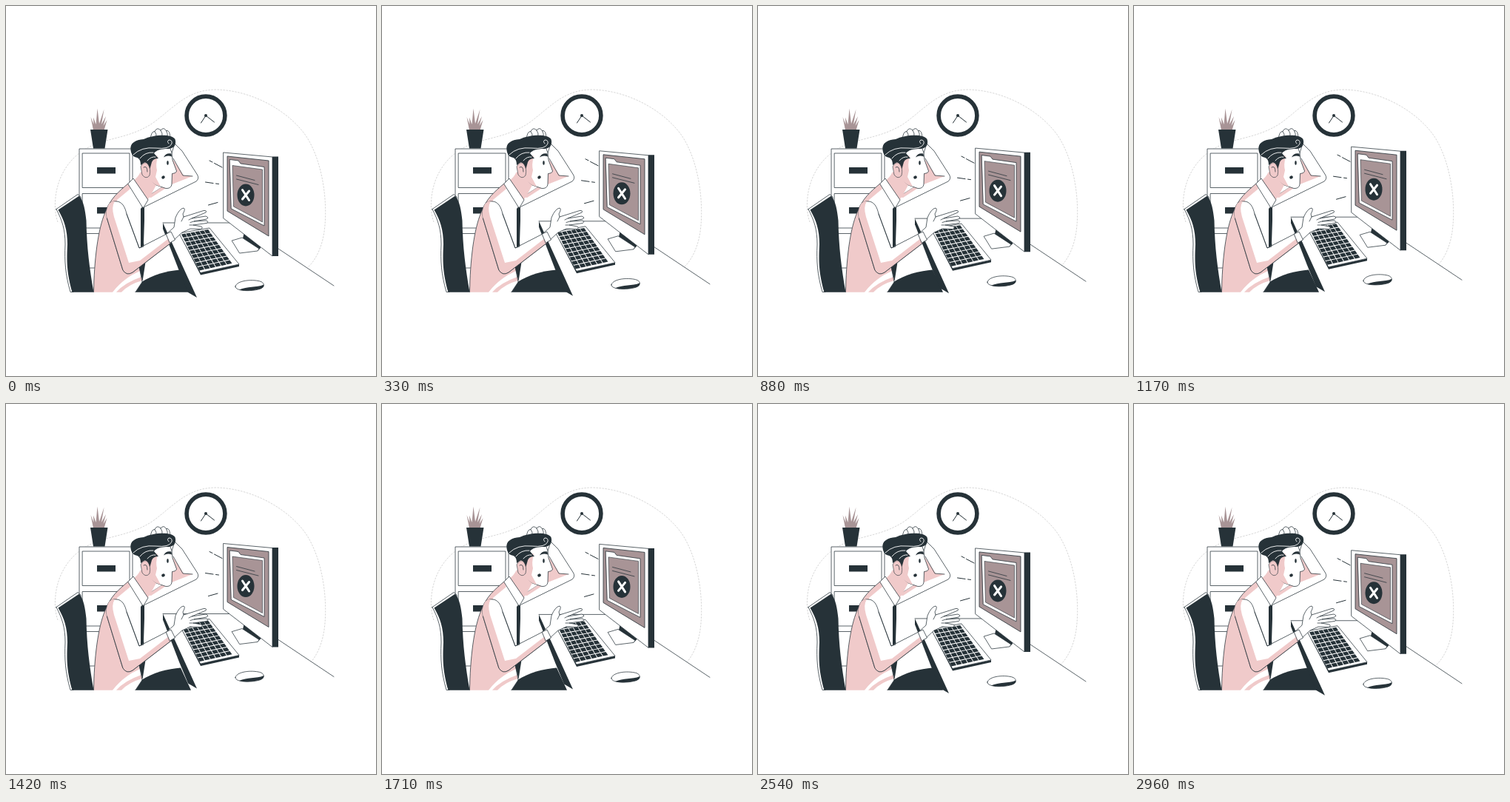
An HTML page for the animation above (3000 ms loop, 500 by 500 pixels).

```html
<!DOCTYPE html>
<html lang="en">
<head>
<meta charset="utf-8">
<title>Computer trouble</title>
<style>
html, body { margin: 0; width: 100%; height: 100%; overflow: hidden; background: #fff; }
svg { display: block; width: 100vmin; height: 100vmin; }
.o { fill: #fff; stroke: #263238; stroke-width: .75; stroke-linejoin: round; stroke-linecap: round; }
.l { fill: none; stroke: #263238; stroke-width: .75; stroke-linecap: round; stroke-linejoin: round; }
.w { fill: none; stroke: #fff; stroke-width: .9; stroke-linecap: round; }
.d { fill: #263238; }
.p { fill: #f0caca; }
.s { fill: #a89496; }
</style>
</head>
<body>
<svg viewBox="0 0 500 500">
  <path d="M70 292C62 270 65 222 103 196C130 177 166 181 200 157C228 136 246 113 284 113C335 114 385 144 407 178C428 212 434 262 431 296C429 322 420 342 408 353" fill="none" stroke="#bdbdbd" stroke-width=".6" stroke-dasharray="2.500 1.500"/>

  <!-- clock -->
  <circle cx="270" cy="148" r="25.9" fill="#fff" stroke="#263238" stroke-width="5.6"/>
  <path class="l" d="M263.500 158L270 148L281.500 157" style="stroke-width:1"/>
  <circle class="d" cx="270" cy="148" r="2"/>

  <!-- cabinet -->
  <path class="o" d="M99 380V193H171V380"/>
  <path class="o" d="M103.500 199H167V245.500H103.500ZM103.500 253.500H167V300H103.500ZM103.500 307.500H167V354H103.500Z"/>
  <path class="d" d="M123 218h25v8.500h-25ZM123 272h25v8.500h-25Z"/>

  <!-- plant -->
  <path class="s" d="M118 168L114.500 150L118.500 160L118 150.500L121.500 160L123.500 138.500L126 159L132.500 139.500L129 160L135 149L131.500 162L136.500 154L132.500 168Z"/>
  <path class="d" d="M114 167H137.500L133.500 192.500H118Z"/>

  <!-- chair -->
  <path class="o" d="M68 274.500L97 254.500L101 258L91 386.500H87C80 362 79 345 80 322C80 302 76 290 68 274.500Z"/>
  <path class="d" d="M70.500 275.500L99 256.500C105 264 107 276 108.500 290C109 325 113 356 118.500 386.800H89.500C82 360 82 345 83 322C83 303 79 290 70.500 275.500Z"/>

  <!-- raised arm -->
  <path class="o" d="M186 272L257 237Q261.500 233 258.500 228L238 196L228 186L222 205L239 229L222 238L190 258Z"/>
  <path class="p" d="M225 207L229 212L240 229L252 230L224 241L196 259L190 258L218 240Z"/>
  <path class="l" d="M226 206L239 229L252 230"/>

  <!-- trousers -->
  <path class="d" d="M174 386.800L183 373C199 363 217 358 236 356.500L250 386.800Z"/>

  <!-- torso -->
  <path d="M118.500 386.800C119 345 124 302 134 279C141 260 155 250 172 234L192 262L187 272L186 328L180 352L184 373L175 386.800Z" fill="#fff"/>
  <path class="p" d="M118.500 386.800C119 345 124 302 134 279C141 260 152 251 165 240L168 247L150 262L152 290L163 361L180 354L181 358C166 365 156 372 144 386.800Z"/>
  <path class="p" d="M149 386.800Q160 374 183 366L184 371Q166 376 156 386.800Z"/>
  <path class="l" d="M118.500 386.500C119 345 124 302 134 279C141 260 152 251 165 240M180 352L184 373L175 386.500"/>
  <path class="d" d="M182 274L187 268L187 290L186 320L189 343L184.500 372L179.500 352L182 328Z"/>

  <!-- head and collar -->
  <path class="p" d="M182 224Q178 232 172 236L191 263Q198 252 203 242Z"/>
  <path class="o" d="M165 240L172 233L192 262L185.500 273Z"/>
  <path class="o" d="M195 181Q196 169 201 169.500Q204 163 209 168Q213 163 216.500 168.500Q222 167 222 180Z"/>
  <path class="l" d="M201 169.500Q204 173 203 177M209 168Q212 172 211 176M216.500 168.500Q219 172 218 177"/>
  <path class="o" d="M196 196L221 190Q225 198 225 208L230.500 223Q230 226 224.500 226.500L224 241Q223 247 216 246.500L203 242L190 230Z"/>
  <path class="p" d="M193 207L205 202Q202 215 204 222L202 231L209 244L203 242L188 231Z"/>
  <path class="d" d="M168.500 195C167 185 175 181 186 180C198 174 224 172 228.500 180C231 188 226 193 219 193C209 193 203 195 200 199L206 206Q199 206 197 211L194.500 220L188 211L182 215C182 207 179 205 174 204Q169.500 202 168.500 195Z"/>
  <path class="w" d="M172 201Q183 190 202 192Q221 194 224 186Q225 181 220 181Q217 183 220 186M181 206Q188 197 199 198M191 209Q196 203 202 204"/>
  <path class="p" d="M182 217Q187 208 192 214Q196 220 194 229Q189 235 184 228Z" stroke="#263238" stroke-width=".6"/>
  <path class="l" d="M186 218Q191 215 191 224"/>
  <path class="d" d="M213 204.500Q216 198 223.500 199.500L224 203.500Q218 201 213 204.500Z"/>
  <ellipse class="d" cx="218.500" cy="212" rx="1.300" ry="3"/>
  <ellipse class="d" cx="212.500" cy="231.500" rx="2.300" ry="2" transform="rotate(-30 212.500 231.500)"/>

  <!-- desk, rising and sinking -->
  <g id="desk">
    <path d="M212 293H305L368 328L443 378V393H258Z" fill="#fff"/>
    <path class="l" d="M212 293H304M368 328L443 378"/>
    <path class="d" d="M212 293L258 394L246 387L234 358L212 301Z"/>

    <path class="l" d="M275 209L279 211M281.500 212.500L292 218M269.500 238L280 239.500M283.500 240L287.500 240.500M273.500 269L286 265.500" style="stroke-width:1"/>

    <path class="d" d="M322 305L344 320V327L340 331L320 314Z"/>
    <path class="o" d="M305.500 317L319 313L342 328L340 331L316 334Z"/>
    <path class="d" d="M360 203.500H368V338H360Z"/>
    <path class="o" d="M294 198L360 204V338L294 287Z"/>
    <path class="s" d="M299 203L355 209V311L299 277Z" stroke="#263238" stroke-width=".8"/>
    <path class="o" d="M302.500 207.500L314 209L317 213L349 217.500V297L304.500 274Z"/>
    <path class="s" d="M306 215.500L346.500 221V292L307.500 271Z" stroke="#263238" stroke-width=".6"/>
    <path class="l" d="M311.500 229L336 235.500M311.500 234L341 241.500"/>
    <ellipse class="d" cx="324" cy="255.500" rx="11.500" ry="15"/>
    <path class="w" d="M319.500 248.500L328.500 262.500M328.500 250L319.500 261" style="stroke-width:3"/>

    <path class="d" d="M234 307L263 360L315 349V352L263 363.500Z"/>
    <path class="o" d="M234 307L275 300L315 349L263 360.500Z"/>
    <path class="d" id="keys"/>

    <path class="o" d="M310 379C311 372 328 369 341 371.500C350 373 350 379 344 382C334 386 309 386 310 379Z"/>
    <path class="d" d="M315 383.500C326 378.500 338 381 348.500 376.500Q349 381 343 382.500Q326 386.500 315 383.500Z"/>
  </g>

  <!-- typing arm -->
  <path class="o" d="M217 308L227 299L229 286Q234 274 240 273Q243 274 239 281L240 285L267 276.500Q272 276 270 279L251 287L270 284Q275 286 271 288L254 291L270 290Q275 291 271 293.500L253 296L264 298Q267 300 263 301.500L249 301L238 306L226 317Z"/>
  <path class="l" d="M240 285L237 291M251 287L247 289M254 291L249 292.500M253 296L248 296"/>
  <path class="o" d="M136.500 287C134 271 140 263 149 264C157 264 161 272 163 281L180 327L217 308L223 320L171 360Q163 365 158 357Z"/>
  <path class="p" d="M136.500 287C134 271 140 263 147 264Q142 271 146 285L166 347L181 344L220 314L223 320L171 360Q163 365 158 357Z"/>
  <path class="l" d="M136.500 287L158 357Q163 365 171 360L223 320M163 281L180 327L186 325"/>
  <path class="o" d="M216.500 308L223 305L228.500 316L221.500 320Z"/>
</svg>
<script>
const mix = (a, b, t) => a + (b - a) * t;
const cols = 6, rows = 9;

// Point on the tilted key field, u across and v down
function spot(u, v) {
  const x = mix(mix(237, 274, u), mix(262, 307, u), v);
  const y = mix(mix(308.5, 302, u), mix(358.5, 348.5, u), v);
  return x.toFixed(1) + ' ' + y.toFixed(1);
}

let keys = '';
for (let r = 0; r < rows; r++) {
  for (let c = 0; c < cols; c++) {
    const u = c / cols, v = r / rows, du = .87 / cols, dv = .82 / rows;
    keys += `M${spot(u, v)}L${spot(u + du, v)}L${spot(u + du, v + dv)}L${spot(u, v + dv)}Z`;
  }
}
document.getElementById('keys').setAttribute('d', keys);

const desk = document.getElementById('desk');
const start = performance.now();
function draw() {
  const p = (performance.now() - start) % 3000 / 3000;
  const lift = 10 * (1 - Math.abs(1 - 2 * p));
  desk.setAttribute('transform', `translate(0 ${-lift})`);
  requestAnimationFrame(draw);
}
draw();
</script>
</body>
</html>
```
